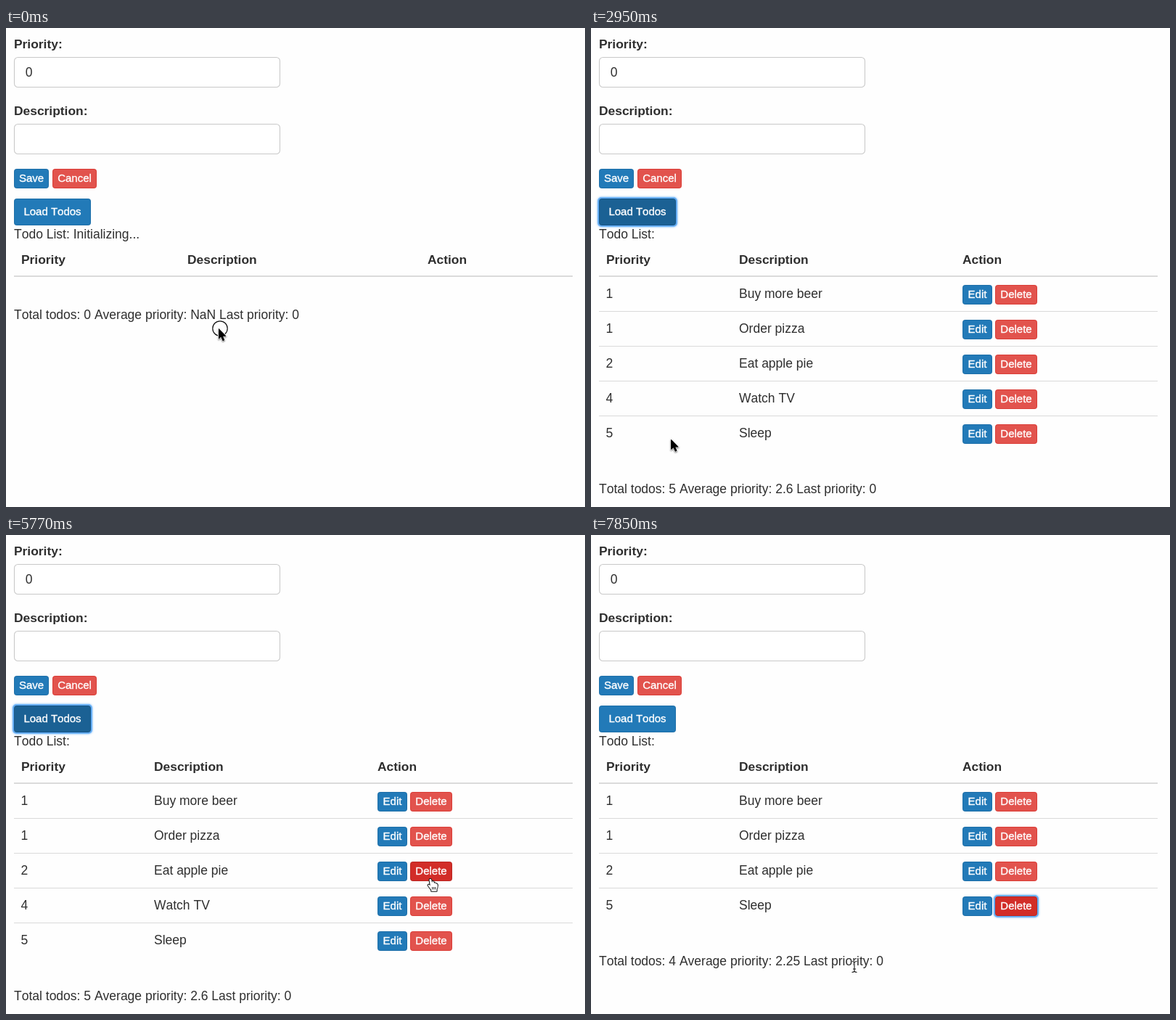
An HTML page with a canvas that plays this animation: 798x660 px, repeating every 7.99 s.

```html
<!DOCTYPE html>
<html lang="en">
<head>
<meta charset="utf-8">
<title>Todo list</title>
<style>
html, body { margin: 0; width: 100%; height: 100%; overflow: hidden; background: #fefefe; }
canvas { display: block; width: 798px; height: 660px; }
</style>
</head>
<body>
<canvas id="stage" width="798" height="660"></canvas>
<script>
const ctx = document.getElementById('stage').getContext('2d');
const LOOP = 7990, TICK = 148;
const FACE = '"Liberation Sans", Arial, sans-serif';
const BODY = `17.5px ${FACE}`, BOLD = `bold 17.4px ${FACE}`, SMALL = `15px ${FACE}`;
const INK = '#2f2f2f';

const BLUE = { base: ['#227ab8', '#1d6fa9'], on: ['#1b6194', '#175585'], press: ['#17527f', '#124468'] };
const RED = { base: ['#e2534d', '#db3d37'], on: ['#d22d28', '#bb2723'], press: ['#b0231f', '#8e1b18'] };

const LOAD = [11, 235, 106, 37];
const TODOS = [[1, 'Buy more beer'], [1, 'Order pizza'], [2, 'Eat apple pie'], [4, 'Watch TV'], [5, 'Sleep']];
const LOADED = 13, REMOVED = 44;

// Pointer waypoints: tick, x, y
const PATH = [
  [0, 293, 414], [9, 60, 271], [11, 55, 254], [15, 55, 254], [22, 124, 644], [23, 124, 644],
  [28, 321, 645], [30, 321, 645], [36, 582, 519], [37, 584, 494], [38, 585, 479], [39, 585, 474],
  [40, 585, 474], [41, 585, 503], [42, 585, 510], [45, 585, 510], [50, 221, 599], [53, 363, 595]
];

function pointer(k) {
  let i = 0;
  while (i < PATH.length - 2 && k > PATH[i + 1][0]) i++;
  const [a, x0, y0] = PATH[i], [b, x1, y1] = PATH[i + 1];
  const u = Math.min(1, (k - a) / (b - a));
  const e = u * u * (3 - 2 * u);
  return [x0 + (x1 - x0) * e, y0 + (y1 - y0) * e];
}

const inside = ([px, py], [x, y, w, h]) => px >= x && px < x + w && py >= y && py < y + h;

function text(str, x, y, font = BODY, color = INK, align = 'left') {
  ctx.font = font;
  ctx.fillStyle = color;
  ctx.textAlign = align;
  ctx.fillText(str, x, y);
}

function box(x, y, w, h, r) {
  ctx.beginPath();
  ctx.roundRect(x, y, w, h, r);
}

function field(y, value) {
  box(11.5, y + 0.5, 366, 41, 5);
  ctx.fillStyle = '#fff';
  ctx.fill();
  ctx.strokeStyle = '#c9c9c9';
  ctx.lineWidth = 1.1;
  ctx.stroke();
  text(value, 26.7, y + 27);
}

function button(label, [x, y, w, h], skin, state = 'base', focus = false) {
  const [fill, edge] = skin[state];
  if (focus) {
    ctx.save();
    ctx.shadowColor = '#4ba0f5';
    ctx.shadowBlur = 3;
    ctx.strokeStyle = '#62adf6';
    ctx.lineWidth = 2;
    box(x - 0.8, y - 0.8, w + 1.6, h + 1.6, 4);
    ctx.stroke();
    ctx.restore();
  }
  box(x, y, w, h, 4);
  ctx.fillStyle = edge;
  ctx.fill();
  box(x + 1, y + 1, w - 2, h - 2, 3);
  ctx.fillStyle = fill;
  ctx.fill();
  const cx = x + w / 2, base = y + h / 2 + 4.7;
  text(label, cx, Math.round(base), SMALL, '#fff', 'center');
  ctx.strokeStyle = '#fff';
  ctx.lineWidth = 0.35;
  ctx.strokeText(label, cx, Math.round(base));
}

function rule(y, h) {
  ctx.fillStyle = '#dadada';
  ctx.fillRect(11, y, 770, h);
}

function outline(path, fill, edge, width) {
  ctx.lineJoin = 'round';
  ctx.lineWidth = width;
  ctx.strokeStyle = edge;
  ctx.fillStyle = fill;
  ctx.stroke(path);
  ctx.fill(path);
}

const ARROW = new Path2D('M0 0V14.4L3.3 11.3L5.8 16.9L8.1 15.9L5.7 10.5H10.3Z');
const HAND = new Path2D('M-1.5 1.3C-1.5-.4 1-.4 1.3 1.2L2.2 5.2C3-.0 5 4.6 5.1 6' +
  'C6 4.8 7.4 5.2 7.6 6.7C8.8 6 9.8 6.8 9.8 8.4C9.9 11 9.4 12.5 8.6 14V16.8H1.2V15' +
  'C-.4 13.2-1.6 11.2-3.2 9.2C-4 7.8-2.2 7-.9 8.6L-.2 9.3Z');
const FOLDS = new Path2D('M2.6 11V14.4M4.7 11V14.4M6.8 11V14.4');
const BEAM = new Path2D('M-3.5-7.5Q-.6-7.5 0-6Q.6-7.5 3.5-7.5M0-6V6M-2 3H2M-3.5 7.5Q-.6 7.5 0 6Q.6 7.5 3.5 7.5');

function drawPointer([x, y], kind) {
  ctx.save();
  ctx.translate(x, y);
  if (kind === 'hand') {
    outline(HAND, '#fff', '#111', 2);
    ctx.lineWidth = 0.9;
    ctx.stroke(FOLDS);
  } else if (kind === 'beam') {
    for (const [color, width] of [['rgba(255,255,255,.75)', 2.6], ['#1a1a1a', 1.1]]) {
      ctx.strokeStyle = color;
      ctx.lineWidth = width;
      ctx.stroke(BEAM);
    }
  } else {
    ctx.shadowColor = 'rgba(0,0,0,.4)';
    ctx.shadowBlur = 2;
    ctx.shadowOffsetY = 1;
    outline(ARROW, '#000', '#fff', 2);
    ctx.shadowColor = 'transparent';
    ctx.fill(ARROW);
  }
  ctx.restore();
}

function clickRing(x, y) {
  for (const [color, width, r] of [['rgba(255,255,255,.85)', 1.4, 9.3], ['#111', 1.2, 10.2]]) {
    ctx.beginPath();
    ctx.arc(x, y, r, 0, Math.PI * 2);
    ctx.strokeStyle = color;
    ctx.lineWidth = width;
    ctx.stroke();
  }
}

function draw(k) {
  const pos = pointer(k);
  const loaded = k >= LOADED;
  const rows = !loaded ? [] : TODOS.filter((_, i) => k < REMOVED || i !== 3);
  const loadFocus = k >= 12 && k < 43, deleteFocus = k >= 43;
  let kind = 'arrow';

  ctx.fillStyle = '#fefefe';
  ctx.fillRect(0, 0, 798, 660);
  ctx.fontKerning = 'none';

  text('Priority:', 11, 28, BOLD);
  field(40, '0');
  text('Description:', 11, 120, BOLD);
  field(132, '');
  button('Save', [11, 194, 48, 27], BLUE);
  button('Cancel', [64, 194, 61, 27], RED);

  const overLoad = inside(pos, LOAD);
  if (overLoad) kind = 'hand';
  const loadOn = loadFocus || (overLoad && k >= 10);
  button('Load Todos', LOAD, BLUE, k === 12 ? 'press' : loadOn ? 'on' : 'base', loadFocus);

  text(loaded ? 'Todo List:' : 'Todo List: Initializing...', 11, 290);
  const [descX, actX] = loaded ? [204, 512] : [250, 581];
  text('Priority', 21, 325, BOLD);
  text('Description', descX, 325, BOLD);
  text('Action', actX, 325, BOLD);
  rule(341, 2);

  rows.forEach(([priority, label], i) => {
    const y = 342 + 48 * i;
    if (i) rule(y, 1);
    text(priority, 20.5, y + 30);
    text(label, descX, y + 30);
    button('Edit', [512, y + 12, 41, 27], BLUE);
    const area = [557, y + 12, 58, 27];
    const over = inside(pos, area), focus = deleteFocus && i === 3;
    if (over) kind = 'hand';
    button('Delete', area, RED, focus && k === 43 ? 'press' : over || focus ? 'on' : 'base', focus);
  });

  const sum = rows.reduce((s, row) => s + row[0], 0);
  const base = 401 + 48 * rows.length;
  text(`Total todos: ${rows.length} Average priority: ${sum / rows.length} Last priority: 0`, 11, base);

  const lines = [[11, 273, loaded ? 76 : 172, 24], [11, base - 18, 395, 23]];
  if (k > 0 && kind === 'arrow' && lines.some(r => inside(pos, r))) kind = 'beam';
  if (k === 0) clickRing(295, 414);
  if (k === 12 || k === 43) clickRing(pos[0] + 1, pos[1] + 1);
  drawPointer(pos, kind);
}

function frame() {
  const t = performance.now() % LOOP;
  draw(Math.min(53, Math.floor((t + 14) / TICK)));
  requestAnimationFrame(frame);
}
frame();
</script>
</body>
</html>
```
